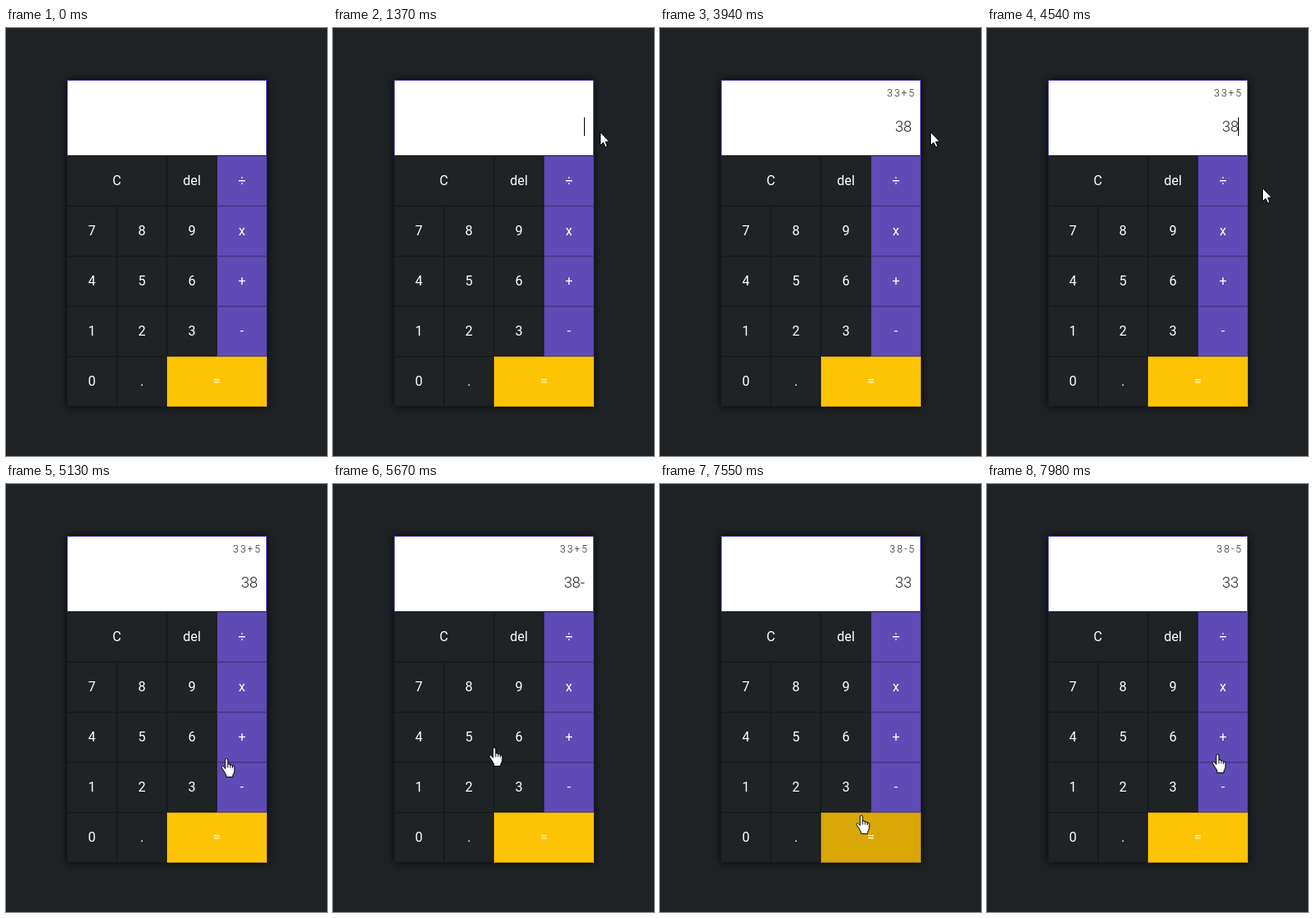
Recreate the animation shown at these times as an HTML page. Size 385 px wide and 512 px high, loop 8000 ms.

```html
<!DOCTYPE html>
<html lang="en">
<head>
<meta charset="utf-8">
<title>Calculator</title>
<style>
  html, body { margin: 0; width: 100%; height: 100%; overflow: hidden; background: #1f2326; }
  body { position: relative; font-family: Roboto, sans-serif; }
  #calculator {
    position: absolute; left: 73px; top: 62px; width: 240px; height: 391px;
    box-shadow: 0 0 10px rgba(0, 0, 0, .75);
  }
  #display {
    position: relative; height: 91px; box-sizing: border-box;
    background: #fff; border: 1px solid #4630a8;
    color: #222; font-weight: 300;
  }
  #display div { position: absolute; white-space: pre; }
  #history { right: 5px; top: 8px; font-size: 12px; line-height: 14px; letter-spacing: 2px; }
  #entry { right: 10px; top: 44px; font-size: 18px; line-height: 21px; }
  #caret { left: 227px; top: 44px; width: 1px; height: 22px; background: #000; }
  #keys { display: grid; grid-template-columns: repeat(4, 60px); grid-auto-rows: 60px; }
  #keys div {
    box-sizing: border-box; border: 1px solid rgba(0, 0, 0, .22);
    background: #1f2326; color: #fff; font-size: 16px; line-height: 58px; text-align: center;
  }
  #keys .wide { grid-column: span 2; }
  #keys .operator { background: #5f4bb6; }
  #keys #equals { background: #fdc406; border-color: rgba(0, 0, 0, .14); }
  #keys #equals.hover { background: #d9a807; }
  svg { position: absolute; left: 0; top: 0; width: 24px; height: 26px; overflow: visible; }
</style>
</head>
<body>
<div id="calculator">
  <div id="display">
    <div id="history"></div>
    <div id="entry"></div>
    <div id="caret"></div>
  </div>
  <div id="keys"></div>
</div>
<svg id="pointer" stroke="#000" fill="#fff">
  <path id="arrow" d="M.5 .5V16.5L4.2 13L6.8 18.5L9.1 17.5L6.7 12H11.5Z"/>
  <g id="hand" transform="translate(-6 0)">
    <path d="M5 2Q5 .5 6.5 .5T8 2V7Q10.5 6.5 11 8Q13 7.6 13.6 9Q16 8.8 16 11V15Q16 17 15 18.5L14 20V22.5H6V20L4 16.5L1 12Q0 10.3 1.3 9.8Q2.5 9.5 3.4 10.7L5 12.5Z"/>
    <path fill="none" d="M8 7V11.5M11 8V11.5M13.6 9V12"/>
  </g>
  <path id="beam" fill="none" d="M-3 -7.5H0M1 -7.5H4M.5 -7V7M-3 7.5H0M1 7.5H4"/>
</svg>
<script>
const LOOP = 8000;
const $ = id => document.getElementById(id);

for (const label of 'C del ÷ 7 8 9 x 4 5 6 + 1 2 3 - 0 . ='.split(' ')) {
  const key = $('keys').appendChild(document.createElement('div'));
  key.textContent = label;
  if ('C='.includes(label)) key.className = 'wide';
  if ('÷x+-'.includes(label)) key.className = 'operator';
  if (label === '=') key.id = 'equals';
}

// [time, x, y] of the pointer's hot spot; repeated positions are rests
const path = [
  [460, 371, 248], [980, 276, 114], [1050, 276, 114], [1240, 305, 119],
  [1370, 320, 124], [1590, 324, 124], [4300, 324, 124], [4540, 330, 191],
  [4740, 357, 258], [5100, 267, 321], [5270, 268, 356], [5400, 268, 356],
  [5670, 193, 315], [5860, 172, 307], [6270, 172, 307], [6390, 165, 319],
  [6680, 221, 397], [6950, 237, 404], [7450, 237, 404], [7980, 276, 323],
  [8000, 276, 323]
];

// [time, entry, history]
const states = [
  [0, '', ''], [2100, '3', ''], [2330, '33', ''], [2660, '33+', ''],
  [3020, '33+5', ''], [3400, '38', '33+5'], [5350, '38-', '33+5'],
  [6270, '38-5', '33+5'], [7200, '33', '38-5']
];

const BLINK = 530, FOCUS = 1040, BLUR = 5300;

function slope(i, axis) {
  const a = path[i - 1], b = path[i], c = path[i + 1];
  const same = (p, q) => p[1] === q[1] && p[2] === q[2];
  if (a && same(a, b) || c && same(b, c)) return 0;
  const from = a || b, to = c || b;
  return (to[axis] - from[axis]) / (to[0] - from[0]);
}

function pointerAt(t) {
  if (t < path[0][0]) {
    if (t < 210 || t >= 300) return null;
    const u = (t - 210) / 90;
    return [373 + 12 * u, 488 + 24 * u];
  }
  const i = path.findIndex(p => p[0] > t) - 1;
  const a = path[i], b = path[i + 1], span = b[0] - a[0], u = (t - a[0]) / span;
  return [1, 2].map(axis => {
    const m = slope(i, axis) * span, n = slope(i + 1, axis) * span, d = b[axis] - a[axis];
    return a[axis] + m * u + (3 * d - 2 * m - n) * u * u + (m + n - 2 * d) * u ** 3;
  });
}

function caretVisible(t, lastInput) {
  if (t < FOCUS || t >= BLUR) return false;
  return Math.floor((t - Math.max(FOCUS, lastInput)) / BLINK) % 2 === 0;
}

const show = (id, on) => $(id).style.display = on ? '' : 'none';

function draw() {
  const t = performance.now() % LOOP;
  const [since, entry, history] = states.filter(s => s[0] <= t).pop();
  $('entry').textContent = entry;
  $('history').textContent = history;
  show('caret', caretVisible(t, since));

  const point = pointerAt(t);
  show('pointer', point);
  const [x, y] = point ? point.map(Math.round) : [-50, -50];
  const inside = x >= 73 && x < 313 && y >= 62 && y < 453;
  show('arrow', !inside);
  show('hand', inside && y >= 153);
  show('beam', inside && y < 153);
  $('pointer').style.transform = `translate(${x}px, ${y}px)`;
  $('equals').classList.toggle('hover', inside && x >= 193 && y >= 393);
  requestAnimationFrame(draw);
}
draw();
</script>
</body>
</html>
```
